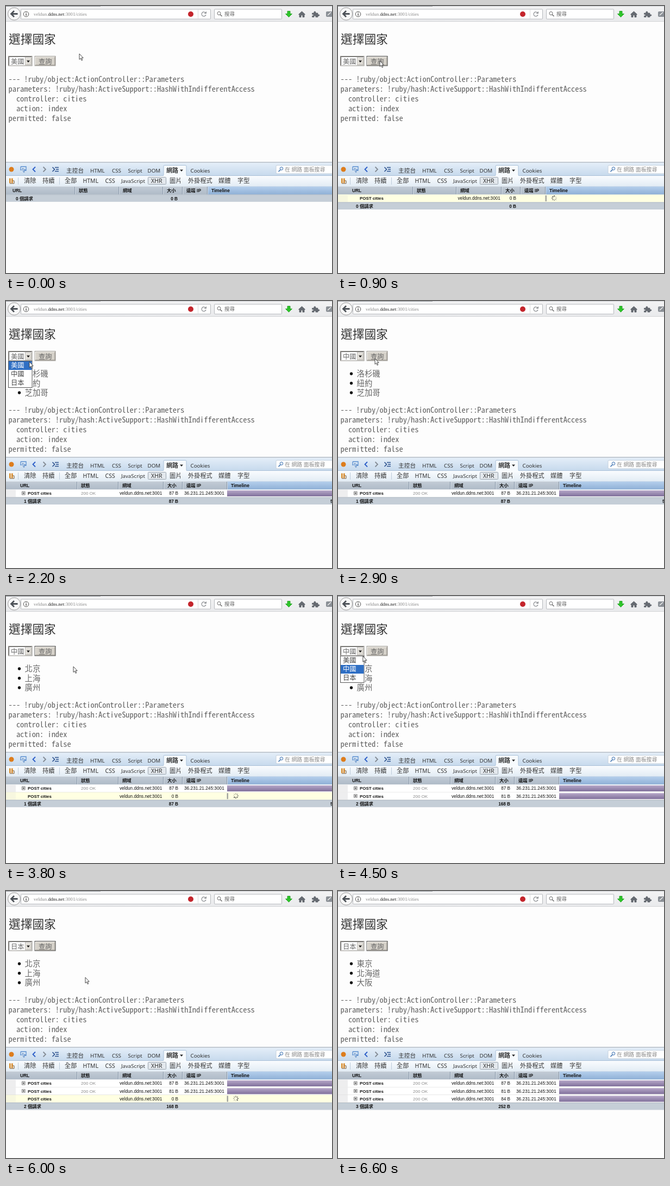
These frames come from a looping animation (600x492 px, 6.9 s). An HTML page:

```html
<!DOCTYPE html>
<html lang="zh-Hant">
<head>
<meta charset="utf-8">
<style>
html, body { margin: 0; width: 600px; height: 492px; overflow: hidden; background: #fdfdfd; }
svg { display: block; }
text { white-space: pre; font-family: 'Noto Sans', 'Noto Sans CJK TC', sans-serif; fill: #333; }
.page { font-family: 'Noto Sans CJK TC', 'Noto Sans CJK JP', sans-serif; font-weight: 300; fill: #666; }
.title { fill: #333; }
.mono { font-family: 'Noto Sans Mono CJK TC', 'Noto Sans Mono CJK JP', monospace; fill: #606060; }
.url { font-family: 'Liberation Serif', serif; fill: #888; }
.cell { font-family: 'Liberation Sans', 'Noto Sans CJK TC', sans-serif; fill: #111; }
.bold { font-weight: 700; }
.dim { fill: #8a8a8a; }
.end { text-anchor: end; }
</style>
</head>
<body>
<svg width="600" height="492" viewBox="0 0 600 492">
  <defs>
    <linearGradient id="chrome" x2="0" y2="1"><stop stop-color="#f3f3f4"/><stop offset="1" stop-color="#e9eaec"/></linearGradient>
    <linearGradient id="tabs" x2="0" y2="1"><stop stop-color="#e4eef8"/><stop offset="1" stop-color="#c6d9ec"/></linearGradient>
    <linearGradient id="tools" x2="0" y2="1"><stop stop-color="#fafcfe"/><stop offset="1" stop-color="#e2ecf5"/></linearGradient>
    <linearGradient id="head" x2="0" y2="1"><stop stop-color="#c3ccd6"/><stop offset="1" stop-color="#aebac7"/></linearGradient>
    <linearGradient id="sorted" x2="0" y2="1"><stop stop-color="#b5cfec"/><stop offset="1" stop-color="#8fb0d6"/></linearGradient>
    <linearGradient id="bar" x2="0" y2="1"><stop stop-color="#b7a8c9"/><stop offset="1" stop-color="#80709b"/></linearGradient>
  </defs>
  <g id="chromeBar"></g>
  <g id="panel"></g>
  <g id="table"></g>
  <g id="page"></g>
  <path id="pointer" d="M0 0V10.5L2.4 8.3 4.2 12.4 5.8 11.6 4 7.7H7.2Z" fill="#fff" stroke="#333" stroke-width=".9"/>
</svg>
<script>
const LOOP = 6900, STEP = 100;
const $ = id => document.getElementById(id);
const text = (x, y, size, str, cls = '') =>
  `<text x="${x}" y="${y}" font-size="${size}" class="${cls}">${str}</text>`;
const rect = (x, y, w, h, fill, more = '') =>
  `<rect x="${x}" y="${y}" width="${w}" height="${h}" fill="${fill}" ${more}/>`;
const path = (d, stroke, width = 1, fill = 'none') =>
  `<path d="${d}" stroke="${stroke}" stroke-width="${width}" fill="${fill}"/>`;
const dot = (x, y, r, fill, stroke = 'none') =>
  `<circle cx="${x}" cy="${y}" r="${r}" fill="${fill}" stroke="${stroke}"/>`;

const countries = ['美國', '中國', '日本'];
const cities = [['洛杉磯', '紐約', '芝加哥'], ['北京', '上海', '廣州'], ['東京', '北海道', '大阪']];
const host = 'veldun.ddns.net:3001';
const sizes = [87, 81, 84];

// when each request is sent, its list is shown, and its row is finished
const requests = [
  { sent: 900, shown: 1300, done: 1300 },
  { sent: 3200, shown: 3600, done: 3900 },
  { sent: 5800, shown: 6200, done: 6200 }
];
const picks = [2700, 5200];
const menus = [[2100, 2700], [4400, 5200]];
const focus = [[900, 2000], [3200, 4300], [5800, LOOP]];
const track = [
  [0, 135, 88], [100, 135, 88], [800, 77, 101], [1100, 77, 101], [1500, 92, 106],
  [2000, 43, 101], [2200, 43, 112], [2500, 43, 134], [2700, 43, 134], [2900, 68, 106],
  [3200, 68, 106], [3800, 124, 130], [4000, 78, 113], [4200, 46, 103], [4400, 46, 103],
  [5000, 45, 150], [5200, 45, 150], [5400, 81, 117], [5700, 75, 102], [5900, 75, 102],
  [6400, 430, 388], [6500, 568, 478], [6600, 630, 510]
];
const within = (t, spans) => spans.some(([a, b]) => t >= a && t < b);

function pointerAt(t) {
  const i = track.findIndex(k => k[0] > t);
  if (i < 0) return track[track.length - 1].slice(1);
  const [t0, x0, y0] = track[i - 1], [t1, x1, y1] = track[i];
  const u = (t - t0) / (t1 - t0);
  return [x0 + (x1 - x0) * u, y0 + (y1 - y0) * u];
}

function drawChrome() {
  $('chromeBar').innerHTML =
    rect(0, 0, 600, 28.5, 'url(#chrome)') + rect(0, 28, 600, 1, '#d2d4d6') +
    rect(0, 0, 174, 1, '#8d9196') + rect(174, 0, 426, 1, '#d0d2d5') +
    rect(27.5, 6, 349, 18, '#fff', 'rx="1" stroke="#b5b8bc"') +
    dot(15, 14.5, 11.5, '#f7f7f7', '#999') +
    path('M21.5 14.5H10M15 9L9.5 14.5 15 20', '#4d5258', 2.8) +
    dot(37, 15, 4.8, '#fff', '#555') + rect(36.4, 14, 1.3, 4, '#444') + rect(36.4, 11.8, 1.3, 1.3, '#444') +
    text(51, 18, 8.9, 'veldun.<tspan fill="#222">ddns.net</tspan>:3001/cities', 'url') +
    dot(340, 15, 5, '#c4252c') + path('M353.5 7V23', '#ddd') +
    path('M367.5 12.8A4 4 0 1 0 368 16M368.4 10.3V13.4H365', '#8b8e92', 1.2) +
    rect(383.5, 6, 124, 18, '#fff', 'rx="1" stroke="#b5b8bc"') +
    dot(392, 13.5, 3, 'none', '#666') + path('M394.2 15.8L397.5 19', '#666', 1.4) +
    text(402, 18.4, 9.5, '搜尋', 'page') +
    path('M518 9.5H523V14.5H526.5L520.5 20.5 514.5 14.5H518Z', '#149b14', .8, '#2fc52b') +
    path('M538.5 15.5L544.5 10 550.5 15.5H549V20.5H546V16.8H543V20.5H540V15.5Z', '#53585e', .8, '#666b72') +
    path('M563.5 13H567C565.5 9 571 9 570 13H574V16C578 15 578 19 574 18.5V20.5H570C570.5 17 566.5 17 567 20.5H563.5V18C567 18 567 15 563.5 15.5Z', '#53585e', .6, '#666b72') +
    rect(589, 10, 12, 10, '#8b9096', 'rx="2"') + path('M592 17L598 11.5', '#eee', 1.5);
}

function drawPanel() {
  const tabs = [[111, '主控台', 10.7], [155, 'HTML'], [195, 'CSS'], [224.5, 'Script'], [260.5, 'DOM'], [339.5, 'Cookies']];
  const tools = [[33, '清除'], [67, '持續'], [108, '全部'], [141.5, 'HTML'], [182.5, 'CSS'], [212, 'JavaScript', 9.6],
    [267, 'XHR'], [301, '圖片'], [335, '外掛程式'], [391, '媒體'], [426, '字型']];
  $('panel').innerHTML =
    rect(0, 287, 600, 3, '#c3cad2') + rect(0, 289, 600, 24, 'url(#tabs)') +
    rect(0, 312.5, 600, 20, 'url(#tools)') + rect(0, 312, 600, 1, '#a9c0d8') +
    rect(290, 293.5, 42, 20, '#f6fafd', 'rx="2" stroke="#a9c0d8"') + rect(290, 312, 42, 3, '#f8fbfe') +
    text(295, 307, 11, '網路', 'bold') + path('M320 301.5H326L323 305Z', 'none', 0, '#222') +
    tabs.map(([x, s, size = 9.8]) => text(x, 307, size, s)).join('') +
    dot(10, 301, 4.5, '#dd7d1d') +
    path('M27 296H37V303H34M27 296V302H29', '#5b8fd0', 1.3) + path('M30 299L36 302 33 303 34 306 32.5 306.5 31.5 304Z', '#2f68b0', .7, '#cfe0f5') +
    path('M54 296.5L49.5 301 54 305.5', '#2a5cc8', 1.8) + path('M68.5 296.5L73 301 68.5 305.5', '#858c95', 1.8) +
    path('M85.5 297L89.5 301 85.5 305', '#2a4f8d', 1.6) + path('M90 297.5H97M92 301H97M90 304.5H97', '#2a4f8d', 1.3) +
    rect(497, 293.5, 106, 15.5, '#fff', 'rx="2" stroke="#c3d0dd"') +
    dot(507, 299.5, 2.8, '#e8f1fb', '#3a6fae') + path('M505 301.7L501.5 305.3', '#3a6fae', 1.6) +
    text(513, 304.7, 9.9, '在 網路 面板搜尋', 'dim') +
    rect(6, 317.5, 2.6, 9, '#d98b2b') + rect(10, 317.5, 2.6, 9, '#d98b2b') + path('M12 322H15V327H7', '#7b5a35') +
    path('M22.5 316V329M98.5 316V329', '#bccbd9') +
    rect(261.5, 315.5, 33, 13, '#e3e8ed', 'rx="1" stroke="#9aa4ae"') +
    tools.map(([x, s, size]) => text(x, 326.2, size || (/[A-Z]/.test(s) ? 10.5 : 11.2), s)).join('');
}

function spinner(x, y, t) {
  let out = `<g transform="translate(${x} ${y}) rotate(${t / STEP * 45})">`;
  for (let i = 0; i < 8; i++)
    out += `<path d="M0 -2.5V-5" stroke="#222" stroke-width="1.3" opacity="${.2 + i * .11}" transform="rotate(${i * 45})"/>`;
  return out + '</g>';
}

function drawTable(t) {
  const rows = requests.filter(r => t >= r.sent);
  const done = rows.filter(r => t >= r.done).length;
  // text columns; the timeline cell starts a little left of the last one
  const cols = done ? [26, 138, 214, 297, 332, 414] : rows.length ? [26, 145, 225, 308, 343, 389] : [12, 134, 215, 296, 332, 378];
  const line = cols[5] - 7.5;
  const sizeEnd = done ? 317 : rows.length ? 328 : 316;
  let out = rect(0, 332.5, 600, 15, 'url(#head)') + rect(line, 332.5, 600 - line, 15, 'url(#sorted)');
  ['URL', '狀態', '網域', '大小', '遠端 IP', 'Timeline'].forEach((s, i) => {
    out += text(cols[i], 343.4, 8.4, s, 'cell bold');
    if (i) out += rect(cols[i] - 8, 333, 1, 14, '#8796a7') + rect(cols[i] - 7, 333, 1, 14, '#d5dde6');
  });
  rows.forEach((r, i) => {
    const y = 347.5 + i * 14.2, base = y + 9.9, ready = t >= r.done;
    out += rect(0, y, 600, 14.2, ready ? '#fff' : '#ffffe2') + rect(0, y, 18, 14.2, ready ? '#eeeeef' : '#f7f7df') +
      rect(0, y + 13.5, 600, .7, '#d9d9d9') +
      text(40, base, 7.9, 'POST cities', 'cell bold') +
      text(done ? 209 : 220.5, base, 8.2, host, 'cell') +
      text(sizeEnd, base, 8.2, (ready ? sizes[i] : 0) + ' B', 'cell end');
    if (ready) {
      out += rect(29.5, y + 4, 5.5, 5.5, '#fff', 'stroke="#777"') + path(`M30.7 ${y + 6.75}H33.9M32.25 ${y + 5.1}V${y + 8.4}`, '#222', .9) +
        text(138, base, 8, '200 OK', 'cell dim') +
        text(328, base, 8.3, '36.231.21.245:3001', 'cell') +
        rect(407, y + 1.5, 193, 11, 'url(#bar)');
    } else {
      out += rect(line, y + 1.5, 2.5, 11, '#a3a5a0') + spinner(line + 16.5, y + 6.5, t);
    }
  });
  const y = 347.5 + rows.length * 14.2;
  const total = sizes.slice(0, done).reduce((a, b) => a + b, 0);
  out += rect(0, y, 600, 13.3, '#c5ced7') + rect(0, y, 600, .7, '#aab5c0') +
    text(rows.length ? 33 : 18, y + 10.2, 8.3, done + ' 個請求', 'cell bold') +
    text(sizeEnd, y + 10.2, 8.2, total + ' B', 'cell bold end');
  if (done === 1) out += text(597, y + 10.2, 8.2, '5', 'cell bold');
  $('table').innerHTML = out;
}

function drawPage(t, [, py]) {
  const shown = requests.filter(r => t >= r.shown).length;
  const picked = picks.filter(p => t >= p).length;
  const ring = within(t, focus) ? '#444' : '#9c9993';
  let out = text(5, 69, 21.7, '選擇國家', 'page title') +
    rect(4.5, 92.5, 43.5, 17.5, '#fff', 'stroke="#8e8b85"') + path('M5.5 109V93.5H47', '#666') +
    text(9, 106.5, 12.2, countries[picked], 'page') +
    rect(35.5, 95, 11, 13.5, '#dedbd5', 'stroke="#a5a29c" stroke-width=".8"') +
    path('M36.5 108V96H46', '#f8f6f2') +
    path('M38 100.5H44L41 104Z', 'none', 0, '#111') +
    rect(53, 92.5, 38, 17.5, '#d6d2ca', `stroke="${ring}"`) +
    path('M54 109V93.5H90', '#f8f6f2') + path('M54 109H90V94', '#8b8780') +
    text(60, 106.5, 12.2, '查詢', 'page');
  if (shown) cities[shown - 1].forEach((c, i) => {
    out += dot(24.5, 134 + i * 17.5, 2.7, '#111') + text(34.5, 139.4 + i * 17.5, 14.4, c, 'page');
  });
  const top = shown ? 206.3 : 140.3;
  ['--- !ruby/object:ActionController::Parameters',
    'parameters: !ruby/hash:ActiveSupport::HashWithIndifferentAccess',
    '  controller: cities', '  action: index', 'permitted: false'
  ].forEach((s, i) => out += text(4.5, top + i * 18, 14.4, s, 'mono'));
  if (within(t, menus)) {
    const over = py < 111 ? picked : Math.min(2, Math.floor((py - 111) / 16));
    out += rect(4.5, 110.5, 43.5, 49, '#fff', 'stroke="#555"');
    countries.forEach((c, i) => {
      const y = 111 + i * 16;
      if (i === over) out += rect(5, y, 42.5, 16, '#2f6fc4');
      out += `<text x="9" y="${y + 12.4}" font-size="12.2" class="page" style="fill:${i === over ? '#fff' : '#444'}">${c}</text>`;
    });
  }
  $('page').innerHTML = out;
}

let last = -1;
function frame() {
  const t = Math.floor(performance.now() % LOOP / STEP) * STEP;
  if (t !== last) {
    last = t;
    const p = pointerAt(t);
    drawTable(t);
    drawPage(t, p);
    $('pointer').setAttribute('transform', `translate(${p})`);
  }
  requestAnimationFrame(frame);
}
drawChrome();
drawPanel();
frame();
</script>
</body>
</html>
```
